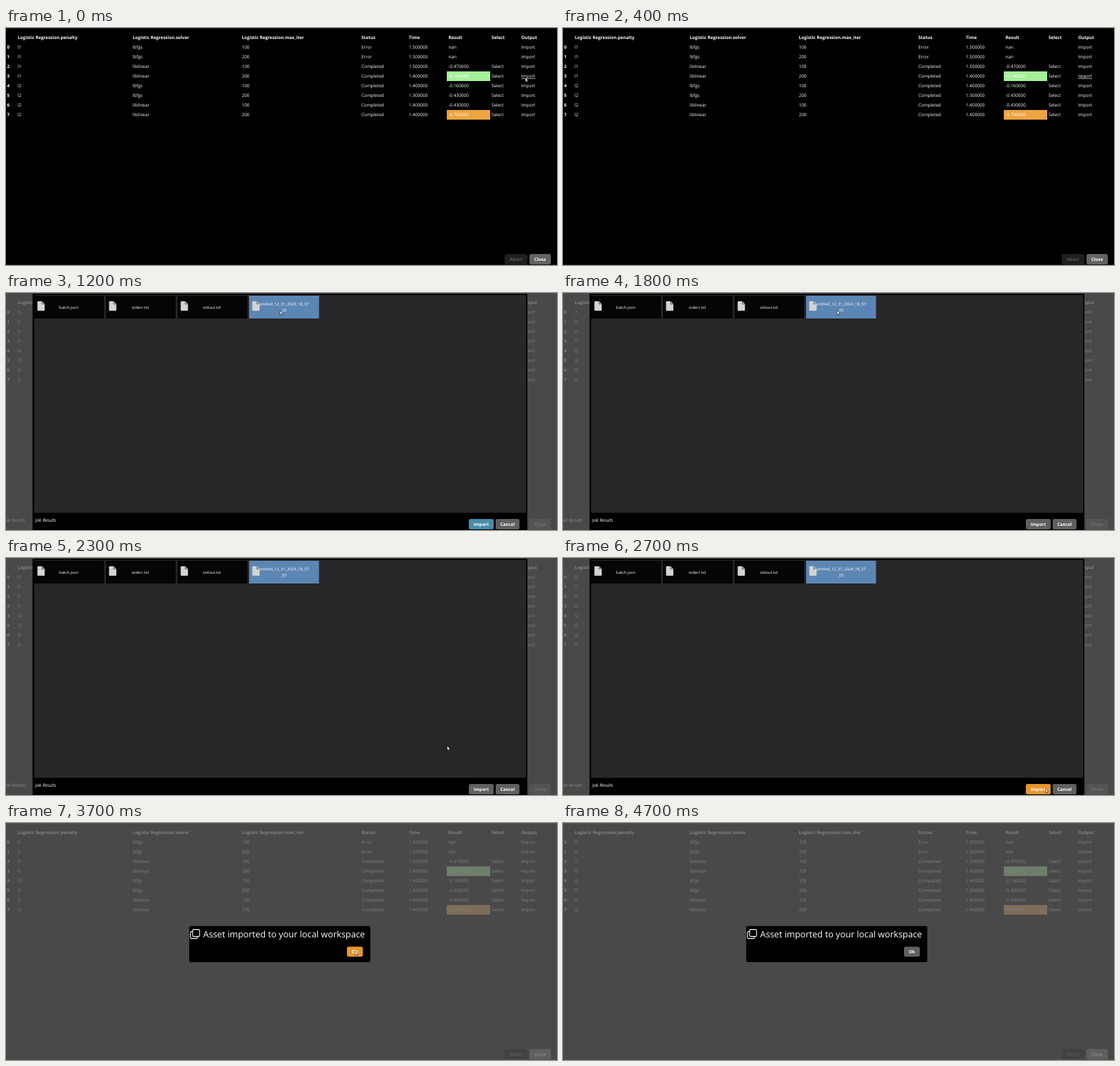
Animation of 800x344 px, one loop 4.8 s. Source, as an HTML page:

```html
<!DOCTYPE html>
<html lang="en">
<head>
<meta charset="utf-8">
<title>Job results</title>
<style>
  html, body { margin: 0; width: 100%; height: 100%; overflow: hidden; background: #000; }
  svg { display: block; width: 800px; height: 344px; }
  text {
    font: 6.4px "Open Sans", "Noto Sans", sans-serif;
    fill: #fff;
    text-rendering: geometricPrecision;
  }
  .b { font-weight: 700; }
  .mid { text-anchor: middle; }
  .file { font-size: 5.8px; text-anchor: middle; }
  .it { font-style: italic; }
  .big { font-size: 12.8px; }
</style>
</head>
<body>
<svg id="stage" viewBox="0 0 800 344"></svg>
<script>
const LOOP = 4800, STEP = 100;
const GREY = '#606060', BLUE = '#4a8baa', ORANGE = '#e6962f', TILE = '#050505', PICKED = '#5b86b4';
const stage = document.getElementById('stage');

function add(parent, tag, attrs = {}, content = '') {
  const el = document.createElementNS('http://www.w3.org/2000/svg', tag);
  for (const k in attrs) el.setAttribute(k, attrs[k]);
  el.textContent = content;
  return parent.appendChild(el);
}
const group = () => add(stage, 'g');
const rect = (p, x, y, width, height, fill, rx = 0) => add(p, 'rect', { x, y, width, height, fill, rx });
const label = (p, x, y, str, cls = '') => add(p, 'text', { x, y, class: cls }, str);

function button(p, x, y, w, h, str, fill) {
  const g = add(p, 'g');
  const box = rect(g, x, y, w, h, fill, 2.5);
  const text = label(g, x + w / 2, y + h / 2 + 2.5, str, 'b mid');
  return { g, box, text };
}
const show = (el, on) => el.setAttribute('display', on ? 'inline' : 'none');
const paint = (el, fill) => el.setAttribute('fill', fill);

// Results table
const COLS = [17, 184, 342.5, 516, 585, 642.5, 705, 748];
const HEAD = ['Logistic Regression.penalty', 'Logistic Regression.solver',
  'Logistic Regression.max_iter', 'Status', 'Time', 'Result', 'Select', 'Output'];
const TIMES = ['1.5', '1.5', '1.5', '1.4', '1.4', '1.3', '1.4', '1.4'];
const SCORES = ['nan', 'nan', '-0.47', '-0.14', '-0.16', '-0.43', '-0.43', '-0.70'];

const table = group();
rect(table, 0, 0, 800, 1, '#1c1c1c');
rect(table, 0, 343, 800, 1, '#161616');
HEAD.forEach((h, i) => label(table, COLS[i], 16.3, h, 'b'));
rect(table, 640, 63, 63, 14, '#a4f098');
rect(table, 640, 119, 63, 14, '#eda43f');
SCORES.forEach((score, r) => {
  const y = 30.3 + 14 * r, failed = score === 'nan';
  label(table, 1.5, y, r, 'b');
  [r < 4 ? 'l1' : 'l2', r % 4 < 2 ? 'lbfgs' : 'liblinear', r % 2 ? 200 : 100,
    failed ? 'Error' : 'Completed', TIMES[r].padEnd(8, '0'),
    failed ? score : score.padEnd(9, '0'), failed ? '' : 'Select', 'Import'
  ].forEach((cell, c) => label(table, COLS[c], y, cell));
});
const underline = rect(table, 748, 73.2, 20.3, 0.6, '#fff');
const abort = button(table, 724, 328, 33, 15, 'Abort', '#1f1f1f');
abort.text.style.fill = '#5a5a5a';
const close = button(table, 760, 328, 31, 15, 'Close', '#636363');

const veil = group();
rect(veil, 0, 0, 800, 344, 'rgba(95,94,95,.78)');
const dimAbort = button(veil, 724, 328, 33, 15, 'Abort', '#434243');
dimAbort.text.style.fill = '#595859';

// File browser
const files = group();
label(files, -2.5, 331.6, 'Job Results', 'it').style.fill = '#8a8a8a';
rect(files, 38.5, 1, 718.5, 343, '#000');
rect(files, 41, 3, 714, 316, '#282628');
const tiles = [['batch.json'], ['stderr.txt'], ['stdout.txt'], ['untitled_12_31_2024_18_57', '_05']]
  .map((lines, i) => {
    const x = 41 + 104 * i;
    const box = rect(files, x, 4, 101.5, 33, TILE);
    const icon = add(files, 'g', { transform: `translate(${x + 4.6} 12)` });
    add(icon, 'path', { d: 'M1.2 0H6.6L10.6 4V12.6Q10.6 13.8 9.4 13.8H1.2Q0 13.8 0 12.6V1.2Q0 0 1.2 0Z', fill: '#d4d4d4' });
    add(icon, 'path', { d: 'M6.6 0.6V4H10', fill: 'none', stroke: '#333', 'stroke-width': 0.8 });
    const top = lines.length > 1 ? 18.2 : 22.6;
    lines.forEach((s, n) => label(files, x + 50.3 + (n || lines.length > 1 ? 0 : -0.2) + (i === 3 ? -0.3 : 0), top + 8.6 * n, s, 'file'));
    return box;
  });
label(files, 42.5, 331.6, 'Job Results', 'it');
const importBtn = button(files, 672, 328, 36, 15, 'Import', BLUE);
button(files, 711, 328, 34.5, 15, 'Cancel', GREY);

// Confirmation
const notice = group();
rect(notice, 266, 149.5, 263, 52.5, '#000', 2.5);
const line = { fill: 'none', stroke: '#fff', 'stroke-width': 1.1, 'stroke-linejoin': 'round' };
add(notice, 'rect', { x: 271, y: 154.6, width: 10, height: 10, rx: 1.4, ...line });
add(notice, 'path', { d: 'M270.8 157.6H269.2Q267.8 157.6 267.8 159V166.2Q267.8 167.6 269.2 167.6H276.6Q278 167.6 278 166.2V164.8', ...line });
label(notice, 286.3, 165.8, 'Asset imported to your local workspace', 'big');
const okBtn = button(notice, 495, 179.5, 23, 14.5, 'Ok', BLUE);

// Pointers
const ink = { fill: '#fff', stroke: '#000', 'stroke-width': 0.5 };
const arrow = add(stage, 'path', { d: 'M0 0V6L1.4 4.8 2.3 6.8 3.3 6.4 2.4 4.5H4.2Z', ...ink });
const resize = add(stage, 'path', {
  d: 'M-4 0L-2 -1.8V-0.4H2V-1.8L4 0 2 1.8V0.4H-2V1.8Z', transform: 'translate(755.3 71.3)', ...ink
});

// time, x, y
const PATH = [
  [0, 754, 72], [600, 755, 71], [1200, 398, 25.5], [1800, 398, 25.5],
  [2500, 700.5, 334], [2800, 700.5, 335], [2900, 700.5, 335], [3400, 507, 186], [LOOP, 507, 186]
];
const ease = u => u * u * (3 - 2 * u);

function pointerAt(t) {
  const i = PATH.findIndex(p => p[0] > t);
  const [t0, x0, y0] = PATH[i - 1], [t1, x1, y1] = PATH[i];
  const u = ease((t - t0) / (t1 - t0));
  return [x0 + (x1 - x0) * u, y0 + (y1 - y0) * u];
}

function draw(t) {
  const browsing = t >= 500 && t < 2800, done = t >= 2800;
  const [x, y] = pointerAt(t);
  const overOk = x < 518 && y < 194;

  show(underline, t < 500);
  show(veil, t >= 500);
  show(files, browsing);
  show(notice, done);
  show(dimAbort.g, done);
  paint(close.box, browsing ? '#303030' : '#636363');
  close.text.style.fill = browsing ? '#bbb' : '#fff';

  paint(tiles[3], t >= 1100 ? PICKED : TILE);
  paint(importBtn.box, t < 1500 ? BLUE : t < 2500 ? GREY : ORANGE);
  paint(okBtn.box, t >= 4500 ? GREY : done && overOk ? ORANGE : BLUE);

  const sizing = t >= 300 && t < 700;
  show(resize, sizing);
  show(arrow, !sizing && t < 4500);
  arrow.setAttribute('transform', `translate(${x} ${y})`);
}

function tick() {
  const t = performance.now() % LOOP;
  draw(Math.floor(t / STEP) * STEP);
  requestAnimationFrame(tick);
}
tick();
</script>
</body>
</html>
```
